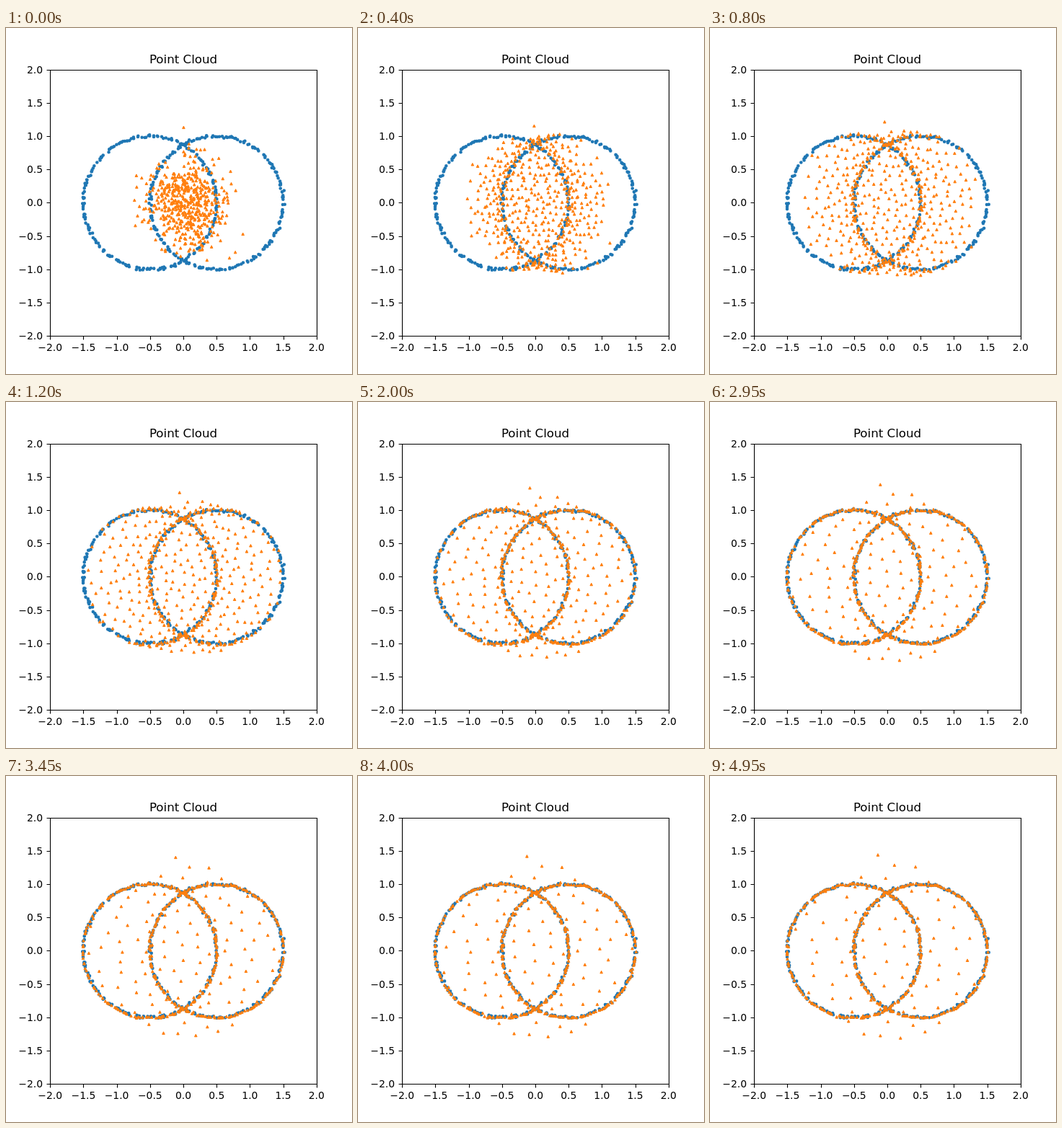
An HTML page that plays this animation: 480x480 px, repeating every 5000 ms.

```html
<!DOCTYPE html>
<html lang="en">
<head>
<meta charset="utf-8">
<title>Point Cloud</title>
<style>
html, body { margin: 0; width: 100%; height: 100%; overflow: hidden; background: #fff; }
svg { display: block; width: 480px; height: 480px; }
text { font: 13.89px "DejaVu Sans", sans-serif; fill: #000; }
.title { font-size: 16.67px; }
.axis { fill: none; stroke: #000; stroke-width: 1.11; }
#rings { fill: #1f77b4; }
#cloud { fill: #ff7f0e; stroke: #ff7f0e; stroke-width: 1; stroke-linejoin: miter; }
</style>
</head>
<body>
<svg viewBox="0 0 480 480">
  <path id="rings"/>
  <path id="cloud"/>
  <g id="axes"></g>
  <text class="title" x="246" y="49" text-anchor="middle">Point Cloud</text>
</svg>
<script>
const STEP_MS = 50, STEPS = 100;
const COUNT = 500, PER_RING = 210;
const REACH = 1, SOFT = 0.05, RATE = 0.1;

const px = x => 246 + 92.4 * x;
const py = y => 242.4 - 92.4 * y;
const $ = id => document.getElementById(id);

// Seeded random numbers
let seed = 20;
function rand() {
  seed = (seed + 0x6D2B79F5) | 0;
  let r = Math.imul(seed ^ (seed >>> 15), 1 | seed);
  r = (r + Math.imul(r ^ (r >>> 7), 61 | r)) ^ r;
  return ((r ^ (r >>> 14)) >>> 0) / 4294967296;
}
const gauss = () =>
  Math.sqrt(-2 * Math.log(1 - rand())) * Math.cos(2 * Math.PI * rand());

function drawAxes() {
  const snap = v => Math.round(v) + 0.5;
  const left = snap(px(-2)), right = snap(px(2));
  const top = snap(py(2)), bottom = snap(py(-2));
  let d = `M${left} ${top}H${right}V${bottom}H${left}Z`;
  let labels = '';
  for (let v = -2; v <= 2; v += 0.5) {
    const name = v.toFixed(1).replace('-', '\u2212');
    d += `M${snap(px(v))} ${bottom}v5M${left} ${snap(py(v))}h-5`;
    labels += `<text x="${px(v)}" y="448" text-anchor="middle">${name}</text>` +
      `<text x="51" y="${Math.round(py(v)) + 5}" text-anchor="end">${name}</text>`;
  }
  $('axes').innerHTML = `<path class="axis" d="${d}"/>${labels}`;
}

// Unit circle of loosely spaced points
const ring = cx => Array.from({ length: PER_RING }, (_, i) => {
  const a = (i + 3 * rand()) / PER_RING * 2 * Math.PI;
  const r = 1 + 0.01 * gauss();
  return [cx + r * Math.cos(a), r * Math.sin(a)];
});
const targets = [...ring(-0.5), ...ring(0.5)];

const startCloud = () => Array.from({ length: COUNT }, () =>
  [0.03 + 0.3 * gauss(), -0.02 + 0.33 * gauss()]);

// Softened 1/distance pull that fades with distance
function pull(dx, dy) {
  const sq = dx * dx + dy * dy;
  return Math.exp(-Math.sqrt(sq) / REACH) / (sq + SOFT * SOFT);
}

// Points repel each other and are drawn to the rings
function advance(points) {
  const n = points.length, m = targets.length;
  const fx = new Float64Array(n), fy = new Float64Array(n);
  for (let i = 0; i < n; i++) {
    const [x, y] = points[i];
    for (let j = 0; j < i; j++) {
      const dx = x - points[j][0], dy = y - points[j][1];
      const w = pull(dx, dy) / n;
      fx[i] += w * dx; fy[i] += w * dy;
      fx[j] -= w * dx; fy[j] -= w * dy;
    }
    for (let j = 0; j < m; j++) {
      const dx = targets[j][0] - x, dy = targets[j][1] - y;
      const w = pull(dx, dy) / m;
      fx[i] += w * dx; fy[i] += w * dy;
    }
  }
  return points.map(([x, y], i) => [x + RATE * fx[i], y + RATE * fy[i]]);
}

const dot = ([x, y]) =>
  `M${(px(x) - 2.3).toFixed(2)} ${py(y).toFixed(2)}a2.3 2.3 0 1 1 4.6 0a2.3 2.3 0 1 1-4.6 0z`;
const triangle = ([x, y]) =>
  `M${px(x).toFixed(2)} ${(py(y) - 1.8).toFixed(2)}l1.8 3.6h-3.6z`;

// States are worked out on demand and kept
const states = [startCloud()];
function stateAt(step) {
  while (states.length <= step) states.push(advance(states[states.length - 1]));
  return states[step];
}

let shown = -1;
function show(now) {
  const step = Math.floor(now / STEP_MS) % STEPS;
  if (step !== shown) {
    $('cloud').setAttribute('d', stateAt(step).map(triangle).join(''));
    shown = step;
  }
}

drawAxes();
$('rings').setAttribute('d', targets.map(dot).join(''));
show(0);
const begin = performance.now();
function tick() {
  show(performance.now() - begin);
  requestAnimationFrame(tick);
}
requestAnimationFrame(tick);
</script>
</body>
</html>
```
